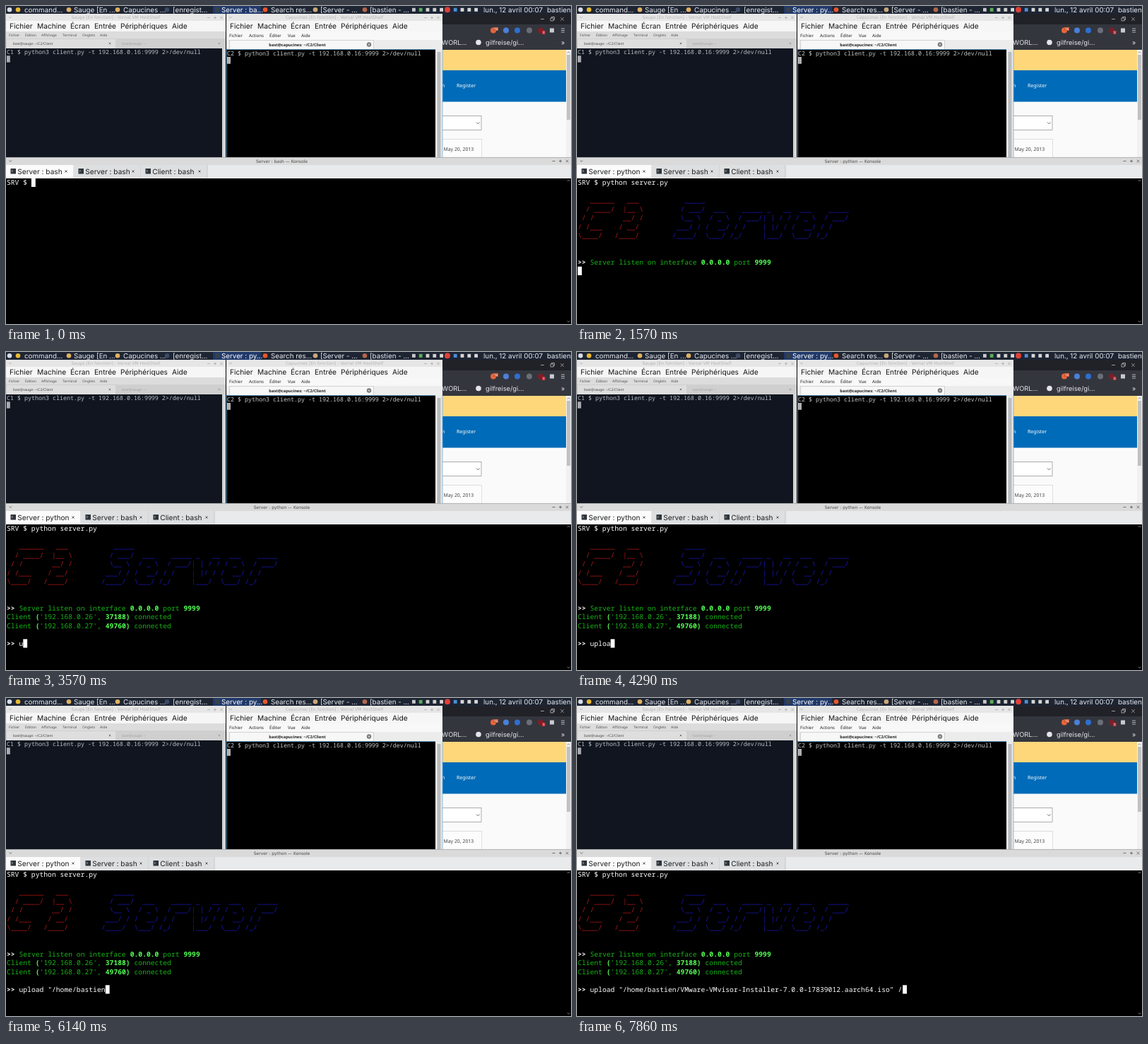
Recreate the animation shown at these times as an HTML page. Size 800x450 px, loop 8 s.

```html
<!DOCTYPE html>
<html lang="fr">
<head>
<meta charset="utf-8">
<title>Terminal session</title>
<style>
  html, body { margin: 0; width: 100%; height: 100%; overflow: hidden; background: #000; }
  svg { display: block; width: 100%; height: 100%; }
  text { white-space: pre; text-rendering: geometricPrecision; }
  .ui { font-family: Inter, sans-serif; }
  .small { font-family: "Noto Sans", sans-serif; }
  .title { font-family: "DejaVu Sans", sans-serif; }
  .mono { font-family: "Noto Sans Mono", monospace; font-variant-ligatures: none; }
</style>
</head>
<body>
<svg id="stage" viewBox="0 0 800 450"></svg>
<script>
const LOOP = 8000, TICK = 1000 / 7;
const CELL = 5.825, ROW = 12.5;
const GREEN = '#18b218', BRIGHT = '#54ff54', WHITE = '#fff';

const rect = (x, y, w, h, fill, extra = '') =>
  `<rect x="${x}" y="${y}" width="${w}" height="${h}" fill="${fill}" ${extra}/>`;
const dot = (x, y, r, fill) => `<circle cx="${x}" cy="${y}" r="${r}" fill="${fill}"/>`;
const path = (d, stroke, width = 0.8) =>
  `<path d="${d}" fill="none" stroke="${stroke}" stroke-width="${width}"/>`;
const escapeText = s => s.replace(/&/g, '&amp;').replace(/</g, '&lt;');
const text = (kind, size, x, y, s, fill, extra = '') =>
  `<text class="${kind}" font-size="${size}" x="${x}" y="${y}" fill="${fill}" ${extra}>${escapeText(s)}</text>`;
const words = (kind, size, y, fill, items) =>
  items.map(([x, s]) => text(kind, size, x, y, s, fill)).join('');
const centred = 'text-anchor="middle"';
const cross = (x, y, r, color) =>
  path(`M${x - r} ${y - r}l${2 * r} ${2 * r}m0 ${-2 * r}l${-2 * r} ${2 * r}`, color);

function taskbar() {
  const icons = [[5, '#d8dce4'], [17, '#e8b931'], [89, '#e0b060'], [158, '#e0b060'], [228, '#3d4a66'],
    [367, '#e8562a'], [438, '#c9a878'], [508, '#b5654a']];
  const tray = ['#c8c8c8', '#58b058', '#d0d0d0', '#d0d0d0', '#d8d8d8', '#e04038', '#4a90d8', '#d8d8d8', '#d8d8d8', '#d8d8d8'];
  return rect(0, 0, 800, 11, '#1d2432') +
    rect(293, 0, 68, 11, '#20396a') +
    icons.map(([x, c]) => dot(x, 5.3, 3.3, c)).join('') +
    rect(296, 2, 6.5, 6.5, '#39404a') +
    tray.map((c, i) => i === 5 ? dot(625, 5.3, 4, c) : rect(575 + i * 9.8, 2.8, 4.8, 5, c)).join('') +
    words('ui', 9.8, 9, '#e9ebef', [
      [26, 'command...'], [96, 'Sauge [En ...'], [166, 'Capucines ...'], [236, '[enregist...'],
      [375, 'Search res...'], [445, '[Server - ...'], [515, '[bastien - ...'],
      [676, 'lun., 12 avril 00:07'], [766, 'bastien']]);
}

function machineWindow(x, width, name) {
  const menu = ['Fichier', 'Machine', 'Écran', 'Entrée', 'Périphériques', 'Aide'];
  const stops = [5, 44, 91, 125, 162, 235];
  return rect(x, 11, width, 203, '#e6e6e6') +
    rect(x, 21, width, 15, '#f6f6f6') +
    text('title', 6, x + width / 2, 18, `${name} [En fonction] - Vornal VM HostShelf`, '#b4b4b4', centred) +
    path(`M${x + 4} 15l2 2l2 -2`, '#aaa') +
    path(`M${x + width - 26} 16.5h4m5 0h4m-2 -2v4`, '#aaa') +
    cross(x + width - 6, 16.5, 1.7, '#aaa') +
    words('ui', 10.2, 32, '#151515', menu.map((s, i) => [x + stops[i], s]));
}

function firstClient() {
  return machineWindow(0, 311, 'Sauge') +
    rect(0, 36, 311, 10, '#dcdcdc') +
    words('small', 4.95, 43, '#555', [[4, 'Fichier'], [27, 'Édition'], [50, 'Affichage'],
      [80, 'Terminal'], [108, 'Onglets'], [133, 'Aide']]) +
    rect(0, 46, 311, 14, '#cfcfcf') +
    rect(1, 47, 154, 13, '#dedede') +
    text('small', 4.9, 10, 55, 'bast@sauge: ~/C2/Client', '#444') +
    text('small', 4.9, 164, 55, 'bast@sauge: ~', '#a0a0a0') +
    cross(147, 53, 1.3, '#666') + cross(302, 53, 1.3, '#999') +
    rect(0, 60, 306, 154, '#10151f') +
    rect(306, 60, 5, 154, '#d4d4d4') +
    text('mono', 8.33, 1, 68, 'C1 $ python3 client.py -t 192.168.0.16:9999 2>/dev/null', '#b9bec6') +
    rect(1, 70.3, 4.8, 9.4, '#a9adb3');
}

function secondClient() {
  return machineWindow(312, 306, 'Capucines') +
    rect(312, 36, 306, 12, '#f8f8f8') +
    words('small', 6.1, 44.3, '#222', [[316, 'Fichier'], [344, 'Actions'], [373, 'Éditer'], [399, 'Vue'], [418, 'Aide']]) +
    rect(312, 48, 306, 14, '#ececec') +
    rect(316.5, 48.5, 204, 13, '#f7f7f7', 'stroke="#c4c4c4" stroke-width=".7"') +
    text('small', 5.7, 412.5, 56.7, 'bast@capucines: ~/C2/Client', '#222', `${centred} font-weight="700"`) +
    dot(514, 54.5, 3.2, '#777') + cross(514, 54.5, 1.2, '#fff') +
    rect(312, 61, 296, 153, '#000') +
    rect(608, 61, 10, 153, '#e9e9e9') +
    rect(610.5, 65, 5, 149, '#b9bbbd') +
    path('M312.4 61.5V214M618 61.5V214M312 61.5H608', '#6faede') +
    text('mono', 8.33, 313, 70, 'C2 $ python3 client.py -t 192.168.0.16:9999 2>/dev/null', '#c6c6c6') +
    rect(313, 72, 5, 9.8, '#b0b0b0');
}

function browser() {
  const extensions = [[690, '#e8653a'], [708, '#4a80d8'], [724, '#2d6fd0'], [741, '#6b6e76'], [757, '#7b1f28']];
  return rect(618, 11, 182, 203, '#fafafa') +
    rect(618, 11, 182, 15, '#202228') +
    rect(618, 26, 182, 36, '#34363e') +
    path('M757 18.5h5M771 17h4v4h-4zM772.5 17v-1.5h4v4h-1.5', '#b8bac0') +
    cross(787.5, 18.5, 2.2, '#b8bac0') +
    extensions.map(([x, c]) => dot(x, 34.5, 4, c)).join('') +
    rect(690, 30, 7, 5, '#c85a38') + text('small', 4.5, 691, 34.2, '16', WHITE) +
    rect(759, 35, 4.5, 5, '#c03038') + text('small', 4.5, 760, 39.2, '3', WHITE) +
    rect(770, 31.5, 6, 6, '#c8cad0') +
    path('M786 32h5m-5 2.5h5m-5 2.5h5', '#d0d2d8') +
    text('ui', 9.3, 617, 54.8, 'WORL...', '#e4e5e9') +
    dot(669, 51.5, 3.8, '#e4e5e9') +
    text('ui', 9.3, 679, 54.8, 'gilfreise/gi...', '#e4e5e9') +
    text('ui', 9, 786, 54.5, '»', '#e4e5e9') +
    rect(618, 62, 182, 29, '#fed77b') +
    rect(618, 91, 182, 44.5, '#006bb8') +
    text('small', 7, 617, 114.5, 'n', WHITE) +
    text('small', 7, 638, 114.5, 'Register', WHITE) +
    rect(610, 155.5, 63, 20, '#fff', 'stroke="#999" stroke-width=".8"') +
    path('M666 164.5l2.3 2.3l2.3 -2.3', '#444') +
    rect(610, 188.5, 63.5, 30, '#fcfcfc', 'stroke="#d6d6d6" stroke-width=".8"') +
    text('small', 6.9, 619.5, 204.5, 'May 20, 2013', '#444') +
    rect(793, 62, 7, 152, '#f1f1f1') +
    rect(794, 69, 5, 92, '#c1c1c1') +
    path('M794.8 66.5l1.7 -1.7l1.7 1.7', '#666');
}

function konsole(running) {
  const process = running ? 'python' : 'bash';
  const ends = running ? [106, 202, 295] : [96, 191, 285];
  const labels = [`Server : ${process}`, 'Server : bash', 'Client : bash'];
  const tabs = labels.map((label, i) => {
    const start = i ? ends[i - 1] : 0, end = ends[i];
    return rect(start, 225, end - start, 18.5, i ? '#dedfe0' : '#fbfbfb') +
      path(`M${end} 225v18`, '#bfc0c2') +
      rect(start + 6.5, 230, 7.5, 7.5, '#2f353b') +
      path(`M${start + 8} 232l1.5 1.5l-1.5 1.5`, '#ddd', 0.7) +
      text('ui', 10.1, start + 16.3, 237.7, label, '#1c1e20') +
      cross(end - 11, 234, 1.5, '#333');
  });
  return text('ui', 9.8, 305, 9, `Server : ${process.slice(0, 2)}...`, WHITE) +
    rect(0, 214, 800, 11, '#dadada') +
    path('M0 214.4H800', '#a8a8a8') +
    path('M4.5 218.5l1.8 1.8l1.8 -1.8M773.5 219.5h4M783 219.5h4m-2 -2v4', '#555') +
    cross(794.5, 219.5, 1.8, '#555') +
    text('title', 6, 390.5, 221.8, `Server : ${process} — Konsole`, '#484848', centred) +
    rect(0, 225, 800, 19, '#e9eaeb') + tabs.join('');
}

const banner = {
  '#b21818': [0, String.raw`
   ______   ___
  / ____/  |__ \
 / /       __/ /
/ /___    / __/
\____/   /____/`],
  '#1818b2': [23, String.raw`
   _____
  / ___/  ___    _____ _   __  ___    _____
  \__ \  / _ \  / ___/| | / / / _ \  / ___/
 ___/ / /  __/ / /    | |/ / /  __/ / /
/____/  \___/ /_/     |___/  \___/ /_/`]
};

// Each part is [string, colour, weight].
function line(row, parts, col = 0) {
  return parts.map(([s, color = WHITE, weight = 400]) => {
    const x = 1 + col * CELL;
    col += s.length;
    return text('mono', CELL / 0.6, x, 253 + row * ROW, s, color, `font-weight="${weight}"`);
  }).join('');
}
const cursor = (row, col) => rect(1 + col * CELL, 243.8 + row * ROW, CELL, 12.2, WHITE);
const client = (row, host, port) => line(row, [
  ['Client ', GREEN], ['(', BRIGHT, 700], [`'192.168.0.${host}', `, GREEN],
  [`${port})`, BRIGHT, 700], [' connected', GREEN]]);

// Typing: [tick, characters shown], linear in between.
const launch = { s: 'python server.py ', keys: [[0, 0], [3, 8], [4, 17]] };
const upload = {
  s: 'upload "/home/bastien/VMware-VMvisor-Installer-7.0.0-17839012.aarch64.iso" /',
  keys: [[24, 0], [25, 1], [35, 9], [43, 21], [49, 26], [50, 26], [51, 73], [54, 76]]
};
function typed({ s, keys }, tick) {
  const next = keys.findIndex(([at]) => at > tick);
  if (next === 0) return '';
  if (next < 0) return s;
  const [t0, n0] = keys[next - 1], [t1, n1] = keys[next];
  return s.slice(0, Math.floor(n0 + (n1 - n0) * (tick - t0) / (t1 - t0)));
}

const ENTER = 7, RUNNING = 8, LISTEN = 9, FIRST = 13, SECOND = 14, PROMPT = 18;

function terminal(tick) {
  const command = 'SRV $ ' + typed(launch, tick);
  let out = line(0, [[command, WHITE, 500]]);
  if (tick < ENTER) return out + cursor(0, command.length);
  if (tick < LISTEN) return out + cursor(1, 0);
  for (const [color, [col, art]] of Object.entries(banner))
    art.split('\n').slice(1).forEach((s, i) => out += line(2 + i, [[s, color]], col));
  out += line(9, [['>>', WHITE, 700], [' Server listen on interface ', GREEN], ['0.0.0.0', BRIGHT, 700],
    [' port ', GREEN], ['9999', BRIGHT, 700]]);
  if (tick >= FIRST) out += client(10, 26, 37188);
  if (tick >= SECOND) out += client(11, 27, 49760);
  if (tick < PROMPT) return out + cursor(10 + (tick >= FIRST) + (tick >= SECOND), 0);
  const entry = typed(upload, tick);
  return out + line(13, [['>>', WHITE, 700], [' ' + entry, WHITE, 500]]) + cursor(13, 3 + entry.length);
}

const stage = document.getElementById('stage');
stage.innerHTML = taskbar() + browser() + firstClient() + secondClient() +
  rect(0, 243.5, 800, 206.5, '#000') +
  path('M794.8 248l1.7 -1.7l1.7 1.7M794.8 445.5l1.7 1.7l1.7 -1.7', '#aaa') +
  '<g id="live"></g>';
const live = document.getElementById('live');

const start = performance.now();
let shown = -1;
function draw() {
  const time = (performance.now() - start) % LOOP;
  const tick = Math.floor((time + 5) / TICK); // small lead keeps rounded step times on their tick
  if (tick !== shown) {
    live.innerHTML = konsole(tick >= RUNNING) + terminal(tick);
    shown = tick;
  }
  requestAnimationFrame(draw);
}
draw();
</script>
</body>
</html>
```
